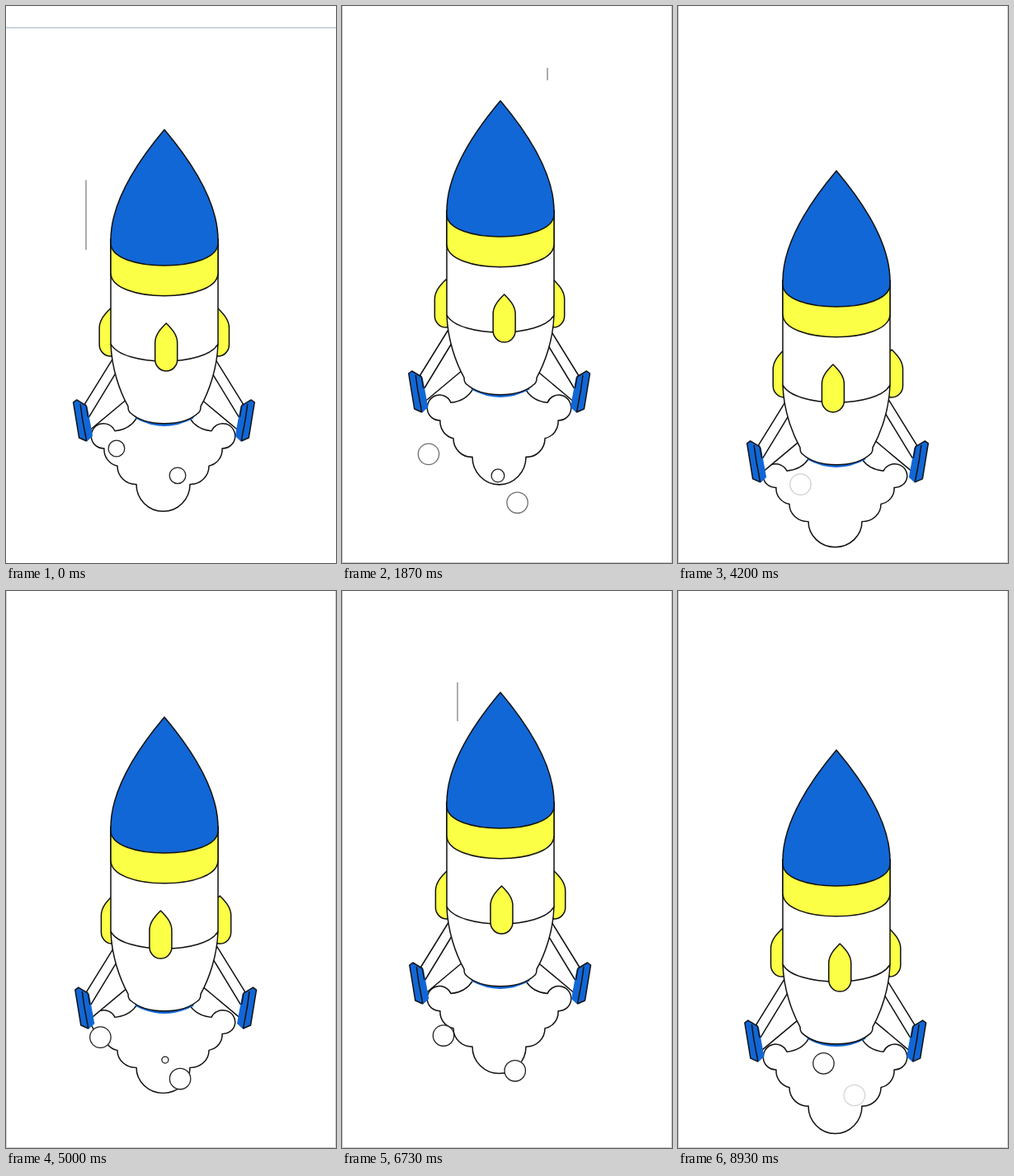
Animation, 400 px wide and 676 px high, one loop 9000 ms. Source, as an HTML page:

```html
<!DOCTYPE html>
<html lang="en">
<head>
<meta charset="utf-8">
<title>Rocket</title>
<style>
  html, body { margin: 0; width: 100%; height: 100%; overflow: hidden; background: #fff; }
  svg { display: block; width: 400px; height: 676px; }
  .ink { stroke: #111; stroke-width: 1.5; stroke-linejoin: round; }
  .white { fill: #fff; }
  .blue { fill: #1167d6; }
  .yellow { fill: #fbff46; }
  .line { fill: none; }
</style>
</head>
<body>
<svg viewBox="0 0 400 676">
  <defs>
    <path id="fin" class="ink yellow" d="M0 0C7 7 13.5 14 13.5 24V44A13.5 14 0 0 1-13.5 44V24C-13.5 14-7 7 0 0Z"/>
    <g id="leg">
      <path class="ink white" d="M97 333L131 278L147 328L104 364Z"/>
      <path class="ink line" d="M102 349L136 293"/>
      <path class="blue" d="M97 334L100 336L106.5 372L99 379L92 334Z"/>
      <path class="ink blue" d="M99 378L90 374L83 331L87 328L98.5 335L101 349"/>
      <path class="ink line" d="M91.5 333L94 351L99 378"/>
    </g>
  </defs>
  <path id="border" d="M.5 0V675.5H399.5V0" fill="none" stroke="#ccc"/>
  <path id="rule" d="M0 26.5H400" stroke="#a9b5c6"/>
  <g id="streaks" stroke="#777" stroke-width="1.2"></g>
  <g id="rocket">
    <g id="cloud">
      <path class="ink white" d="M158 351Q150 364 132 366A15 15 0 1 0 119 387A20 20 0 0 0 135 408A22 22 0 0 0 158 430A32.5 32.5 0 0 0 223 430A22 22 0 0 0 246 408A20 20 0 0 0 262 387A15 15 0 1 0 249 366Q231 364 223 351"/>
    </g>
    <g id="sides">
      <use href="#leg" x="-.7"/>
      <use href="#leg" transform="matrix(-1 0 0 1 385 0)"/>
      <use href="#fin" x="127.4" y="217"/>
      <use href="#fin" x="257.7" y="217"/>
    </g>
    <path d="M157 349Q192 368 227 349" fill="none" stroke="#1167d6" stroke-width="3"/>
    <path class="ink white" d="M127 133V260C128 290 138 318 148 336Q148 342 151 344C170 361 214 361 233 344Q236 342 236 336C246 318 256 290 257 260V133Z"/>
    <path class="ink line" d="M127 260C141 288 243 288 257 260"/>
    <path class="ink yellow" d="M127 133V174C127 211 257 211 257 174V133Z"/>
    <path class="ink blue" d="M192 0C160 38 127 88 127 134V138C127 174 257 174 257 138V134C257 88 224 38 192 0Z"/>
    <use id="frontFin" href="#fin" y="235"/>
  </g>
  <g id="bubbles" class="white" stroke="#222" stroke-width="1.3"></g>
</svg>
<script>
const LOOP = 9000, BUBBLE_LIFE = 900, STREAK_LIFE = 600;
const $ = id => document.getElementById(id);
const clamp = v => Math.max(0, Math.min(1, v));
const mix = (a, b, p) => a + (b - a) * p;

// Height of the rocket tip: [time, y]
const heights = [[0, 150], [650, 137], [1300, 124], [1870, 115], [2320, 127], [2800, 140],
  [3200, 151.2], [3730, 186], [4000, 204], [4200, 200], [4670, 163], [5150, 150], [5800, 135],
  [6730, 123], [7020, 118], [7470, 129], [8400, 153], [8930, 193], [9000, 198]];

const bubblePaths = [
  { from: [143.5, 534.7], to: [96, 546], starts: [-180, 1141, 4450, 6343] },
  { from: [206.5, 559], to: [214, 613], starts: [-180, 1141, 4450, 6343, 8048] },
  { from: [197, 568], to: [147, 581], starts: [1726, 3327, 4927, 8561] },
];

const streaks = [
  { x: 97, y: 211, length: 85, start: -300 },
  { x: 249, y: 75, length: 90, start: 1820 },
  { x: 135.5, y: 76, length: 94, start: 5212 },
  { x: 287, y: 328, length: 85, start: 5575 },
  { x: 140, y: 63, length: 95, start: 6280 },
];

function add(parent, tag) {
  return $(parent).appendChild(document.createElementNS('http://www.w3.org/2000/svg', tag));
}

function set(node, attributes) {
  for (const name in attributes) node.setAttribute(name, attributes[name]);
}

for (const path of bubblePaths) path.node = add('bubbles', 'circle');
for (const streak of streaks) streak.node = add('streaks', 'line');

function slope(i) {
  const a = heights[Math.max(0, i - 1)], b = heights[Math.min(heights.length - 1, i + 1)];
  return (b[1] - a[1]) / (b[0] - a[0]);
}

// Cubic Hermite curve through the height points
function tipHeight(t) {
  const i = heights.findIndex(point => point[0] > t) - 1;
  const [t0, y0] = heights[i], [t1, y1] = heights[i + 1];
  const span = t1 - t0, p = (t - t0) / span, q = 1 - p;
  return q * q * (1 + 2 * p) * y0 + p * p * (3 - 2 * p) * y1
    + span * p * q * (q * slope(i) - p * slope(i + 1));
}

function drawBubble({ from, to, starts, node }, t) {
  const start = starts.find(s => t >= s && t < s + BUBBLE_LIFE);
  const p = start === undefined ? 1 : (t - start) / BUBBLE_LIFE;
  set(node, {
    cx: mix(from[0], to[0], p),
    cy: mix(from[1], to[1], p),
    r: 12.7 * clamp(p / 0.26),
    opacity: p < 1 ? clamp((1.05 - p) * 2.7) : 0,
  });
}

function drawStreak({ x, y, length, start, node }, t) {
  const p = (t - start) / STREAK_LIFE;
  set(node, {
    x1: x, x2: x,
    y1: y + length * clamp(2 * p - 1),
    y2: y + length * clamp(2 * p),
    opacity: p > 0 && p < 1 ? 1 : 0,
  });
}

function draw(t) {
  const turn = 0.3 + 5 * Math.cos((t - 1300) / 6900 * 2 * Math.PI);
  const stretch = 1 + (turn - 0.9) * 0.0085;
  set($('rocket'), { transform: `translate(0 ${tipHeight(t)})` });
  set($('frontFin'), { x: 192 + turn });
  set($('sides'), { transform: `translate(${-0.33 * turn} 0)` });
  set($('cloud'), { transform: `translate(0 ${340 * (1 - stretch) - 0.5}) scale(1 ${stretch})` });
  set($('border'), { opacity: t < 70 ? 0 : 1 });
  set($('rule'), { opacity: t < 1000 ? 1 : 0 });
  bubblePaths.forEach(path => drawBubble(path, t));
  streaks.forEach(streak => drawStreak(streak, t));
}

const begin = performance.now();
function tick() {
  draw((performance.now() - begin) % LOOP);
  requestAnimationFrame(tick);
}
tick();
</script>
</body>
</html>
```
